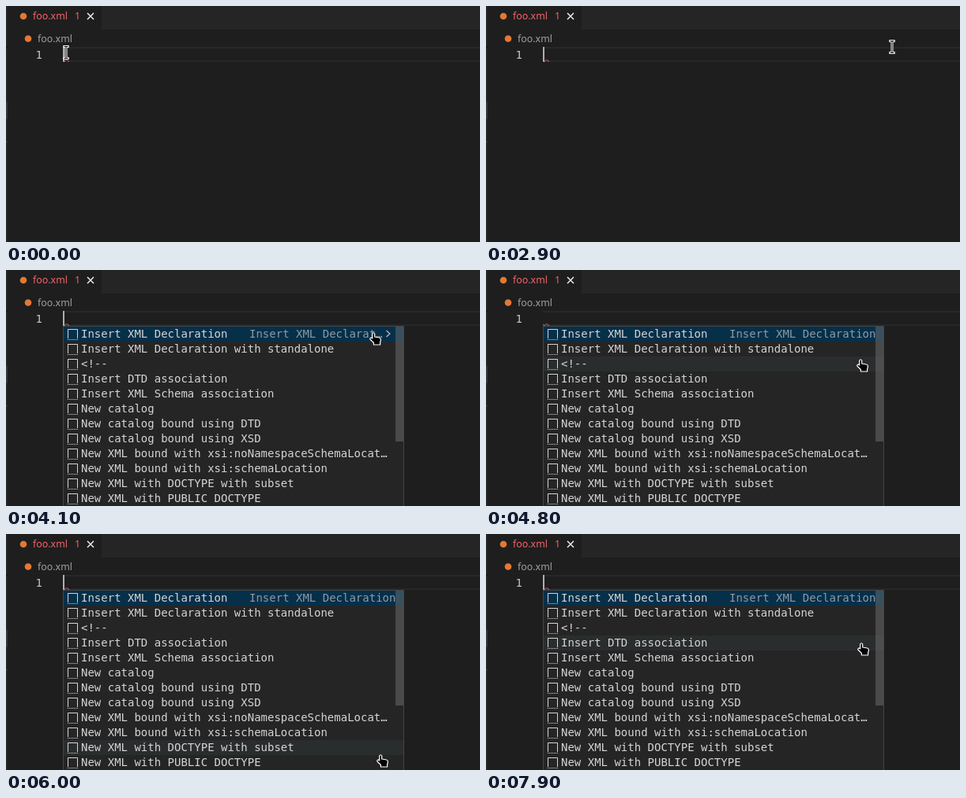
An HTML page that plays this animation: 600 by 300 pixels, repeating every 8000 ms.

```html
<!DOCTYPE html>
<html lang="en">
<head>
<meta charset="utf-8">
<title>Editor completion</title>
<style>
  html, body { margin: 0; width: 100%; height: 100%; overflow: hidden; background: #1e1e1e; }
  svg { display: block; width: 600px; height: 300px; }
  text { white-space: pre; }
  .ui { font: 12.4px "Noto Sans", "Open Sans", sans-serif; }
  .code { font: 14px "DejaVu Sans Mono", monospace; fill: #d4d4d4; }
</style>
</head>
<body>
<svg viewBox="0 0 600 300">
  <defs>
    <pattern id="wave" x="72" y="68" width="6" height="3" patternUnits="userSpaceOnUse">
      <path fill="#f14c4c" d="M5.5 0L2.5 3H1.1L4.1 0zM4 0L6 2V.6L5.4 0zM0 2L1 3H2.4L0 .6z"/>
    </pattern>
    <path id="snippet" fill="#d4d4d4" d="M2.5 1l-.5.5V13h1V2h11v11h1V1.5l-.5-.5zM2 14h1v1H2zM4 14h1v1H4zM6 14h1v1H6zM8 14h1v1H8zM10 14h1v1h-1zM12 14h1v1h-1zM14 14h1v1h-1z"/>
  </defs>

  <rect width="600" height="300" fill="#1e1e1e"/>
  <rect width="600" height="30" fill="#252526"/>
  <rect x="2" width="119" height="30" fill="#1e1e1e"/>
  <rect width="2" height="300" fill="#252526"/>
  <rect y="52" width="2" height="1" fill="#141414"/>
  <rect y="122" width="2" height="22" fill="#37373d"/>
  <rect y="172" width="2" height="1" fill="#414143"/>

  <g class="ui">
    <circle cx="22" cy="13" r="4.3" fill="#e37933"/>
    <text x="34" y="17" fill="#f0646a">foo.xml</text>
    <text x="87" y="17" fill="#f0646a">1</text>
    <path d="M103 9l8 8m0-8l-8 8" stroke="#fff" stroke-width="1.3"/>
    <circle cx="28" cy="41.5" r="4.3" fill="#e37933"/>
    <text x="40" y="46" fill="#a0a0a0">foo.xml</text>
  </g>

  <path d="M72 53H600M72 70H600" stroke="#282828" stroke-width="2"/>
  <text class="code" x="37.5" y="67" style="fill:#c6c6c6">1</text>
  <rect x="72" y="68" width="8" height="3" fill="url(#wave)"/>
  <rect id="caret" x="72" y="52" width="2" height="19" fill="#aeafad"/>

  <g id="popup">
    <rect x="72.5" y="71.5" width="431" height="240" fill="#252526" stroke="#454545"/>
    <rect x="73" y="72" width="430" height="19" fill="#062f4a"/>
    <rect id="hover" x="73" width="430" height="19" fill="#2a2d2e"/>
    <g id="rows" class="code"></g>
    <text id="detail" class="code" x="308" y="86" opacity=".65"></text>
    <path id="more" d="M481.5 77l4.5 4-4.5 4" fill="none" stroke="#c5c5c5" stroke-width="1.1"/>
    <rect id="bar" x="493" y="72" width="10" height="146" fill="#797979" opacity=".45"/>
  </g>

  <g id="mouse" stroke-linejoin="round">
    <g id="beam" fill="none">
      <path d="M-2.2-7.5H2.2M0-7.5V7.5M-2.2 7.5H2.2" stroke="#fff" stroke-width="3" stroke-linecap="square"/>
      <path d="M-2.5-7.5H2.5M0-7.5V7.5M-2.5 7.5H2.5" stroke="#000"/>
    </g>
    <path id="arrow" d="M0 .5V16L3.6 12.8 6.4 19 9 17.8 6.3 11.7H11.2z" fill="#000" stroke="#fff" stroke-width="1.1"/>
    <path id="hand" d="M-1.3 2Q.2-.5 1.7 2V6L7.5 7Q9.6 7.6 9.5 9.6L8.6 13V16H.4V13.5L-4 9.2Q-4.6 6.8-2.6 7L-1.3 8z" fill="#000" stroke="#fff" stroke-width="1.2"/>
  </g>
</svg>

<script>
const LOOP = 8000, STEP = 100, ROW = 19, TOP = 72, OPEN = 3100;
const $ = id => document.getElementById(id);
const show = (id, on) => $(id).setAttribute("visibility", on ? "inherit" : "hidden");

const items = [
  "Insert XML Declaration",
  "Insert XML Declaration with standalone",
  "<!--",
  "Insert DTD association",
  "Insert XML Schema association",
  "New catalog",
  "New catalog bound using DTD",
  "New catalog bound using XSD",
  "New XML bound with xsi:noNamespaceSchemaLocat…",
  "New XML bound with xsi:schemaLocation",
  "New XML with DOCTYPE with subset",
  "New XML with PUBLIC DOCTYPE"
];

$("rows").innerHTML = items.map((label, i) => {
  const y = TOP + i * ROW;
  return `<use href="#snippet" x="76" y="${y + 2}"/>` +
    `<text x="95" y="${y + 14}">${label.replace("<", "&lt;")}</text>`;
}).join("");

// Pointer path: time, x, y
const path = [
  [800, 76, 59], [900, 92, 57], [1100, 230, 50], [1300, 398, 44], [1500, 480, 42], [1700, 514, 52],
  [3500, 514, 52], [3700, 509, 60], [3900, 489, 73], [4100, 465, 79],
  [4200, 465, 79], [4500, 470, 90], [4800, 474, 113], [5100, 475, 133], [5400, 475, 185],
  [5600, 475, 225], [5800, 474, 259], [6000, 474, 280], [6100, 474, 284],
  [6600, 474, 284], [6700, 474, 281], [7000, 474, 264], [7200, 475, 240], [7500, 475, 196], [7900, 475, 138]
];

function pointer(t) {
  if (t <= path[0][0]) return path[0].slice(1);
  const i = path.findIndex(p => p[0] >= t);
  const [t0, x0, y0] = path[i - 1], [t1, x1, y1] = path[i];
  const k = (t - t0) / (t1 - t0);
  return [x0 + (x1 - x0) * k, y0 + (y1 - y0) * k].map(Math.round);
}

function caretOn(t) {
  return t < 900 ? t < 300 : Math.floor((t + 100) / 500) % 2 === 0;
}

function draw(ms) {
  const t = Math.floor(ms % LOOP / STEP) * STEP;
  const [x, y] = pointer(t);
  const open = t >= OPEN;
  const over = open && x < 504 && y >= TOP;
  const row = over ? Math.floor((y - TOP) / ROW) : -1;

  show("caret", caretOn(t));
  show("popup", open);
  show("hover", row > 0);
  $("hover").setAttribute("y", TOP + row * ROW);
  show("more", row === 0);
  show("bar", over);
  show("detail", t > OPEN);
  $("detail").textContent = row === 0 ? "Insert XML Declarat…" : items[0];

  $("mouse").setAttribute("transform", `translate(${x} ${y})`);
  show("hand", over);
  show("arrow", !over && y < 52);
  show("beam", !over && y >= 52);
}

const start = performance.now();
function tick() {
  draw(performance.now() - start);
  requestAnimationFrame(tick);
}
tick();
</script>
</body>
</html>
```
